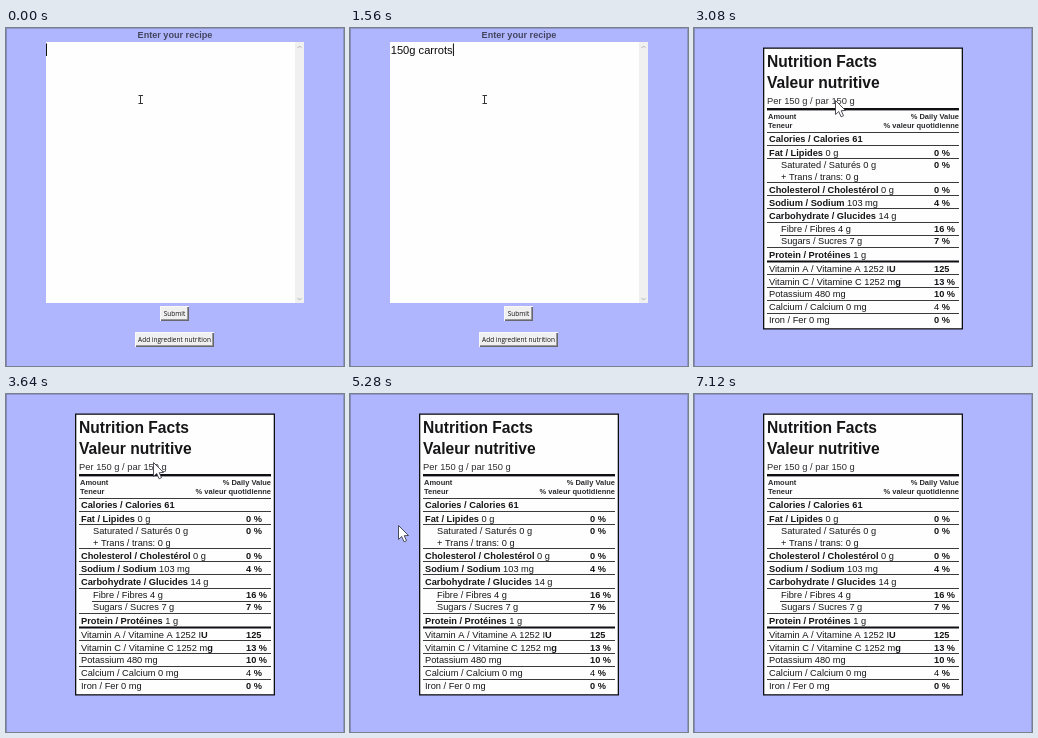
An HTML page with a canvas for the animation above (7720 ms loop, 338 px wide and 338 px high).

```html
<!DOCTYPE html>
<html lang="en">
<head>
<meta charset="utf-8">
<title>Recipe nutrition</title>
<style>
html, body { margin: 0; width: 100%; height: 100%; overflow: hidden; background: #b0b6fe; }
canvas { display: block; width: 338px; height: 338px; }
</style>
</head>
<body>
<canvas id="stage"></canvas>
<script>
const SIZE = 338, LOOP = 7720, STEP = 40;
const SANS = '"Liberation Sans", Arial, sans-serif';
const UI = '"Open Sans", "Noto Sans", sans-serif';
const INK = '#161618';
const RECIPE = '150g carrots';
const TYPE_START = 320, TYPE_GAP = 104;
const PRESS = 2440, SUBMIT = 2560, LEAVE = 6480;

const canvas = document.getElementById('stage');
const ctx = canvas.getContext('2d');
const ratio = window.devicePixelRatio || 1;
canvas.width = canvas.height = SIZE * ratio;
ctx.scale(ratio, ratio);

// Pointer path: time, x, y
const PATH = [
  [0, 134, 71], [1720, 134, 71], [2120, 181, 315], [2360, 169, 286],
  [2640, 169, 286], [3040, 141, 72], [3280, 141, 72], [3600, 147, 68],
  [4480, 147, 68], [4840, 64, 118], [4960, 43, 131], [5280, 48, 131],
  [5440, 48, 131], [5640, 74, 130], [6000, 160, 119], [6320, 229, 115],
  [6440, 324, 170]
];

// Baseline, indent, styled parts ('*' marks bold), daily value
const ROWS = [
  [114, 75, ['*Calories / Calories 61']],
  [127.5, 75, ['*Fat / Lipides ', '0 g'], ['*0 %']],
  [140, 87, ['Saturated / Saturés 0 g'], ['*0 %']],
  [151.5, 87, ['+ Trans / trans: 0 g']],
  [164.5, 75, ['*Cholesterol / Cholestérol ', '0 g'], ['*0 %']],
  [177.5, 75, ['*Sodium / Sodium ', '103 mg'], ['*4 %']],
  [191, 75, ['*Carbohydrate / Glucides ', '14 g']],
  [204, 87, ['Fibre / Fibres 4 g'], ['*16 %']],
  [216, 87, ['Sugars / Sucres 7 g'], ['*7 %']],
  [229.5, 75, ['*Protein / Protéines ', '1 g']],
  [243.5, 75, ['Vitamin A / Vitamine A 1252 I', '*U'], ['*125']],
  [256.5, 75, ['Vitamin C / Vitamine C 1252 m', '*g'], ['*13 %']],
  [269, 75, ['Potassium 480 mg'], ['*10 %']],
  [282, 75, ['Calcium / Calcium 0 mg'], ['4 ', '*%']],
  [295, 75, ['Iron / Fer 0 mg'], ['*0 %']]
];

// Rule lines: y, left, thickness
const RULES = [
  [80, 73, 2.4], [104, 73, 1], [117, 73, 1], [130, 73, 1], [154, 73, 1],
  [167, 73, 1], [180, 73, 1], [194, 73, 1], [207, 86, 1], [219, 73, 1],
  [232.5, 73, 2], [246, 73, 1], [259, 73, 1], [272, 73, 1], [285, 73, 1]
];

function box(x, y, w, h, color) {
  ctx.fillStyle = color;
  ctx.fillRect(x, y, w, h);
}

function text(str, x, y, font, color = INK, align = 'left') {
  ctx.font = font;
  ctx.fillStyle = color;
  ctx.textAlign = align;
  ctx.fillText(str, x, y);
  return ctx.measureText(str).width;
}

function parts(list, x, y) {
  for (const part of list) {
    const bold = part[0] === '*';
    x += text(bold ? part.slice(1) : part, x, y, `${bold ? 'bold ' : ''}9.25px ${SANS}`);
  }
}

function line(points, color, width, close, fill) {
  ctx.beginPath();
  points.forEach(([x, y]) => ctx.lineTo(x, y));
  if (close) ctx.closePath();
  if (fill) {
    ctx.fillStyle = fill;
    ctx.fill();
  }
  ctx.strokeStyle = color;
  ctx.lineWidth = width;
  ctx.stroke();
}

function button(x, y, w, label, down) {
  const h = 15;
  box(x, y, w, h, down ? '#6a6a70' : '#f8f8f8');
  box(x + 1, y + 1, w - 1, h - 1, down ? '#f8f8f8' : '#66676f');
  box(x + 1, y + 1, w - 2.2, h - 2.2, '#a5a5a8');
  box(x + 1, y + 1, w - 3, h - 3, '#f0f0f0');
  const shift = down ? 0.6 : 0;
  text(label, x + w / 2 + shift, y + 9.8 + shift, `6.5px ${UI}`, '#101010', 'center');
}

function drawForm(t) {
  text('Enter your recipe', 169, 10, `bold 9.1px ${SANS}`, '#42465f', 'center');
  box(40, 14, 249, 261, '#fefefe');
  box(289, 14, 9, 261, '#f0f0f0');
  line([[291.5, 20], [293.5, 18], [295.5, 20]], '#b4b4b4', 1);
  line([[291.5, 270], [293.5, 272], [295.5, 270]], '#b4b4b4', 1);

  const count = Math.max(0, Math.floor((t - TYPE_START) / TYPE_GAP) + 1);
  const typed = RECIPE.slice(0, count);
  const width = text(typed, 40.7, 26, `11.15px ${SANS}`, '#0c0c0c');
  box(count ? 41 + width : 40, 15.5, 1, 12.5, '#111');

  button(154, 278, 29, 'Submit', t >= PRESS && t < SUBMIT);
  button(129, 304, 79, 'Add ingredient nutrition', false);
}

function drawLabel() {
  box(69, 19.5, 200, 282, '#101014');
  box(70.3, 20.8, 197.4, 279.4, '#fefefe');
  text('Nutrition Facts', 73, 39, `bold 15.6px ${SANS}`);
  text('Valeur nutritive', 73, 60.3, `bold 15.6px ${SANS}`);
  text('Per 150 g / par 150 g', 73, 76, `9.35px ${SANS}`, '#2c2c30');

  const small = `bold 7.5px ${SANS}`;
  text('Amount', 74, 91.3, small, '#2a2a2e');
  text('Teneur', 74, 100.3, small, '#2a2a2e');
  text('% Daily Value', 265, 91.3, small, '#2a2a2e', 'right');
  text('% valeur quotidienne', 265, 100.3, small, '#2a2a2e', 'right');

  for (const [y, x, h] of RULES) box(x, y, 265 - x, h, h > 1 ? '#101014' : '#3a3a3e');
  for (const [y, x, name, value] of ROWS) {
    parts(name, x, y);
    if (value) parts(value, 240, y);
  }
}

function pointerAt(t) {
  const i = PATH.findIndex(p => p[0] > t);
  if (i < 0) return PATH[PATH.length - 1].slice(1);
  const [t0, x0, y0] = PATH[i - 1], [t1, x1, y1] = PATH[i];
  const u = (t - t0) / (t1 - t0), e = u * u * (3 - 2 * u);
  return [x0 + (x1 - x0) * e, y0 + (y1 - y0) * e];
}

function drawArrow(x, y) {
  const shape = [[0, 0], [0, 14], [3.2, 11], [5.6, 16.3], [8, 15.2], [5.7, 10.2], [10, 10]];
  line(shape.map(([a, b]) => [x + a + 0.5, y + b + 0.5]), '#3c3d48', 0.9, true, '#fff');
}

function drawBeam(x, y, color) {
  x = Math.round(x) + 0.5;
  y = Math.round(y) + 0.5;
  line([[x, y - 4], [x, y + 4]], color, 1);
  for (const end of [-4, 4]) line([[x - 2, y + end], [x + 2.5, y + end]], color, 1);
}

function drawPointer(t) {
  if (t >= LEAVE) return;
  const [x, y] = pointerAt(t);
  const inField = t < SUBMIT && x > 40 && x < 289 && y > 14 && y < 275;
  const inLabel = t > 5640 && x > 70 && x < 268;
  if (inField || inLabel) drawBeam(x, y, inField ? '#333' : '#707074');
  else drawArrow(x, y);
}

function render(now) {
  const t = Math.floor((now % LOOP) / STEP) * STEP;
  box(0, 0, SIZE, SIZE, '#b0b6fe');
  box(0, 0, SIZE, 1, '#9096ca');
  box(0, 0, 1, SIZE, '#858ab8');
  box(SIZE - 1, 0, 1, SIZE, '#9096ca');
  if (t < SUBMIT) drawForm(t);
  else drawLabel();
  drawPointer(t);
}

const start = performance.now();
function tick() {
  render(performance.now() - start);
  requestAnimationFrame(tick);
}
tick();
</script>
</body>
</html>
```
